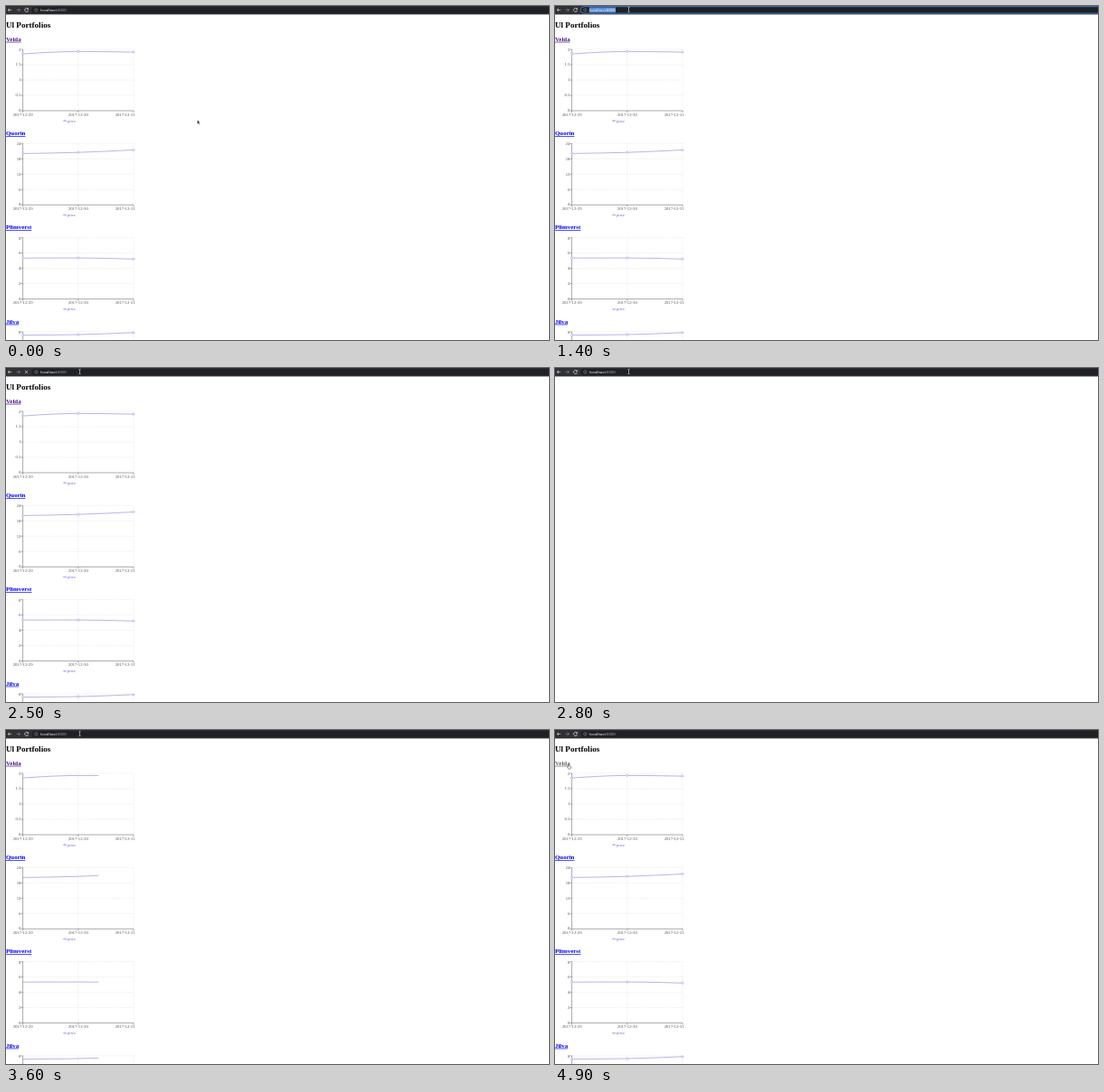
These frames come from a looping animation (600x370 px, 5 s). An HTML page:

```html
<!DOCTYPE html>
<html lang="en">
<head>
<meta charset="utf-8">
<title>Price charts</title>
<style>
  html, body { margin: 0; width: 100%; height: 100%; overflow: hidden; background: #fff; }
  svg { display: block; width: 600px; height: 370px; }
  text { font-family: "Liberation Serif", "Times New Roman", serif; }
  .url { font: 4.35px Roboto, Arial, sans-serif; }
  .title { font-size: 9.1px; font-weight: bold; }
  .link { font-size: 6.9px; font-weight: bold; text-decoration: underline; fill: #0000ee; }
  .tick { font-size: 4.7px; fill: #555; }
  .axis { fill: none; stroke: #666; stroke-width: .55; }
  .grid { fill: none; stroke: #ccc; stroke-width: .38; stroke-dasharray: 1.15 1.15; }
  .line { fill: none; stroke: #8884d8; stroke-width: .6; }
  .dot { fill: #fff; stroke: #8884d8; stroke-width: .45; }
  .icon { fill: none; stroke: #dfe0e2; stroke-width: .7; }
</style>
</head>
<body>
<svg id="stage" viewBox="0 0 600 370"></svg>
<script>
const NS = "http://www.w3.org/2000/svg";
const LOOP = 5000, STEP = 100;
const LEFT = 18.6, MID = 79.8, RIGHT = 141, ROW = 104.3;
const stage = document.getElementById("stage");

function add(parent, tag, attrs = {}, text) {
  const el = document.createElementNS(NS, tag);
  for (const key in attrs) el.setAttribute(key, attrs[key]);
  if (text !== undefined) el.textContent = text;
  parent.appendChild(el);
  return el;
}
const path = (parent, cls, d, more) => add(parent, "path", { class: cls, d, ...more });
const label = (parent, cls, x, y, text, more) => add(parent, "text", { class: cls, x, y, ...more }, text);
const show = (el, on) => el.setAttribute("visibility", on ? "visible" : "hidden");

// Monotone curve through three evenly spaced points
function curve(y) {
  const dx = MID - LEFT, a = (y[1] - y[0]) / dx, b = (y[2] - y[1]) / dx;
  const m = a * b <= 0 ? 0 : Math.sign(a) * 2 * Math.min(Math.abs(a), Math.abs(b), Math.abs(a + b) / 4);
  const h = dx / 3, m0 = (3 * a - m) / 2, m2 = (3 * b - m) / 2;
  return `M${LEFT} ${y[0]}C${LEFT + h} ${y[0] + m0 * h} ${MID - h} ${y[1] - m * h} ${MID} ${y[1]}` +
    `S${RIGHT - h} ${y[2] - m2 * h} ${RIGHT} ${y[2]}`;
}

// CSS "ease" timing: cubic-bezier(.25, .1, .25, 1)
function ease(p) {
  if (p <= 0 || p >= 1) return Math.min(1, Math.max(0, p));
  const bez = (u, a, b) => 3 * u * (1 - u) * ((1 - u) * a + u * b) + u ** 3;
  let lo = 0, hi = 1;
  for (let i = 0; i < 24; i++) {
    const u = (lo + hi) / 2;
    if (bez(u, .25, .25) < p) lo = u; else hi = u;
  }
  return bez(lo, .1, 1);
}

// Page
const heading = label(stage, "title", 0, 23.7, "Ul Portfolios");
const list = add(stage, "g");
const lines = [], links = [];
const dots = add(list, "g");

const charts = [
  { name: "Velda", ticks: [2, 1.5, 1, .5, 0], y: [53.1, 50.4, 51.1] },
  { name: "Quorin", ticks: [24, 18, 12, 6, 0], y: [59.1, 57.9, 55.2] },
  { name: "Plimverst", ticks: [8, 6, 4, 2, 0], y: [70.6, 70.5, 71.7] },
  { name: "Jilva", ticks: [8, 6, 4, 2, 0], y: [51.7, 51.1, 48.9] }
];

charts.forEach((chart, i) => {
  const at = { transform: `translate(0 ${i * ROW})` };
  const g = add(list, "g", at);
  links.push(label(g, "link", 0, 38.7, chart.name));

  const top = 48, gap = 17, base = top + 4 * gap;
  let grid = "", axis = `M${LEFT} ${top}V${base}H${RIGHT}`;
  chart.ticks.forEach((value, k) => {
    const y = top + k * gap;
    if (k < 4) grid += `M${LEFT} ${y}H${RIGHT}`;
    axis += `M${LEFT - 2.3} ${y}H${LEFT}`;
    const nudge = k === 0 ? 2.1 : k === 4 ? 1 : 1.4;
    label(g, "tick", 16.4, y + nudge, value, { "text-anchor": "end" });
  });
  [LEFT, MID, RIGHT].forEach((x, k) => {
    if (k) grid += `M${x} ${top}V${base}`;
    axis += `M${x} ${base}v2.2`;
    label(g, "tick", k === 2 ? 131.6 : x, base + 5.6, "2017-12-" + (29 + k), { "text-anchor": "middle" });
  });
  path(g, "grid", grid);
  path(g, "axis", axis);

  path(g, "line", "M63 127.2H67.2");
  add(g, "circle", { class: "dot", cx: 65.1, cy: 127.2, r: .8 });
  label(g, "tick", 67.8, 128.6, "price", { style: "fill:#6f6bd0" });

  lines.push(path(g, "line", curve(chart.y), { pathLength: 1 }));
  const marks = add(dots, "g", at);
  [LEFT, MID, RIGHT].forEach((cx, k) => add(marks, "circle", { class: "dot", cx, cy: chart.y[k], r: 1.1 }));
});
list.appendChild(dots);

// Browser bar
add(stage, "rect", { width: 600, height: 9.4, fill: "#303135" });
const field = add(stage, "rect", { x: 28.4, y: .7, width: 590, height: 7.4, rx: 3.7, fill: "#202124" });
path(stage, "icon", "M6.2 4.4H2.2M4 2.6L2.2 4.4L4 6.2");
path(stage, "icon", "M11.6 4.4H15.6M13.8 2.6L15.6 4.4L13.8 6.2", { style: "stroke:#85878b" });
const reload = path(stage, "icon", "M24.2 3.2A2 2 0 1 0 24.6 4.8M24.6 2.2V3.7H23");
const stop = path(stage, "icon", "M20.9 2.8L24.1 6M24.1 2.8L20.9 6");
add(stage, "circle", { class: "icon", cx: 33.3, cy: 4.4, r: 1.7, style: "stroke-width:.4;stroke:#aaacb0" });
path(stage, "icon", "M33.3 4.1V5.4M33.3 3.2V3.6", { style: "stroke-width:.4;stroke:#aaacb0" });
const marked = add(stage, "rect", { x: 37.8, y: 1.5, width: 29.2, height: 5.8, fill: "#5b8fd2" });
const url = label(stage, "url", 38.2, 5.9, "", { fill: "#e8eaed" });
add(url, "tspan", {}, "localhost");
const port = add(url, "tspan", {}, ":8000");

// Pointers
const pointers = {
  arrow: path(stage, "", "M0 0V4.5L1 3.6L1.7 5.2L2.5 4.8L1.8 3.3H3.2Z",
    { fill: "#111", stroke: "#fff", "stroke-width": .35 }),
  beam: path(stage, "", "M-1 -2.6Q0 -2.6 0 -2Q0 -2.6 1 -2.6M0 -2V2M-1 2.6Q0 2.6 0 2Q0 2.6 1 2.6",
    { fill: "none", stroke: "#e6e6e6", "stroke-width": .6 }),
  hand: path(stage, "", "M0 0Q.6 -.6 1 0V1.6L3 2V3.8L2.4 5H.4L-1.2 2.8L-.7 2.3L0 2.9Z",
    { fill: "#fff", stroke: "#222", "stroke-width": .45 })
};

// time, pointer, x, y
const moves = [
  [0, "arrow", 211.4, 126.2], [100, "arrow", 207, 103], [200, "arrow", 202.4, 80.2],
  [400, "none", 0, 0],
  [700, "arrow", 85, 52], [800, "arrow", 84.6, 34], [900, "arrow", 83.5, 19],
  [1000, "arrow", 82.4, 10], [1100, "beam", 81.8, 5], [1200, "beam", 81.5, 4],
  [3800, "beam", 77, 6], [3900, "arrow", 66, 14], [4000, "arrow", 52, 23],
  [4100, "arrow", 40, 31], [4200, "arrow", 30, 36], [4300, "arrow", 26.3, 37],
  [4400, "arrow", 22, 37.4], [4500, "hand", 17, 38], [4600, "hand", 14.6, 38.2]
];

function draw(t) {
  const focused = t >= 1400 && t < 2500;
  field.setAttribute("stroke", focused ? "#3f76bd" : "none");
  show(marked, focused);
  port.setAttribute("fill", focused ? "#fff" : "#9aa0a6");

  const loading = t >= 2500 && t < 2800;
  show(stop, loading);
  show(reload, !loading);

  show(heading, t < 2800 || t >= 2900);
  list.style.display = t < 2800 || t >= 3100 ? "" : "none";
  show(dots, t < 2800 || t >= 4600);

  const shown = t < 2800 ? 1 : ease((t - 3100) / 1250);
  for (const line of lines) {
    line.setAttribute("stroke-dasharray", shown < 1 ? `${shown} 2` : "none");
    show(line, shown > 0);
  }
  links[0].style.fill = t >= 4900 ? "#666" : "#47178a";

  const [, kind, x, y] = moves.filter(m => m[0] <= t).pop();
  for (const name in pointers) {
    show(pointers[name], name === kind);
    pointers[name].setAttribute("transform", `translate(${x} ${y})`);
  }
}

const start = performance.now();
function tick() {
  const t = (performance.now() - start) % LOOP;
  draw(Math.floor(t / STEP) * STEP);
  requestAnimationFrame(tick);
}
tick();
</script>
</body>
</html>
```
